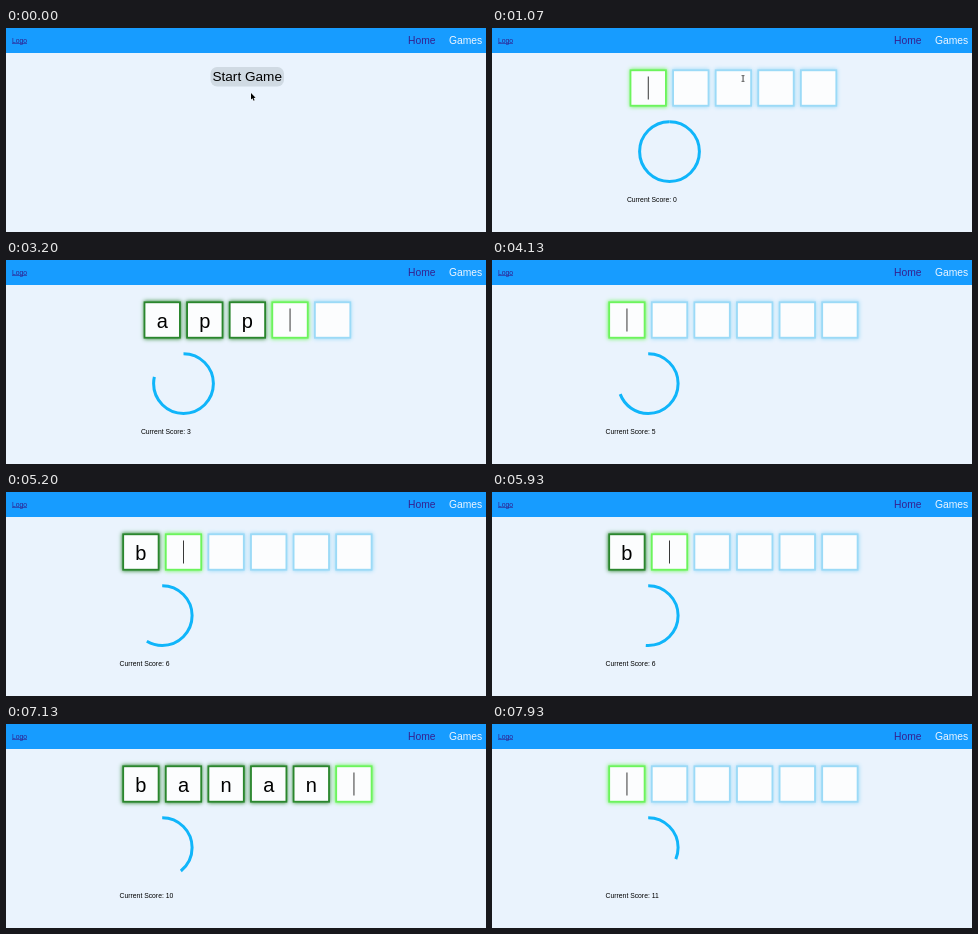
Recreate the animation shown at these times as an HTML page with a canvas. Size 480x204 px, loop 8 s.

```html
<!DOCTYPE html>
<html lang="en">
<head>
<meta charset="utf-8">
<title>Typing game</title>
<style>
  html, body { margin: 0; width: 100%; height: 100%; overflow: hidden; background: #eaf3fd; }
  canvas { display: block; }
</style>
</head>
<body>
<canvas id="stage" width="480" height="204"></canvas>
<script>
const ctx = document.getElementById('stage').getContext('2d');
const LOOP = 8000, GAME_START = 1000, TIMER_START = 1060, TIMER = 10000;
const PITCH = 42.6, MIDDLE = 241.4, BOX = 36;
const words = ['apple', 'banana', 'orange'];
// Times of the key presses, in ms
const keys = [2330, 2670, 3000, 3470, 3740, 4930, 6330, 6670, 6800, 6950, 7470];

function text(str, x, y, size, color, align = 'left') {
  ctx.font = `${size}px "Liberation Sans", Arial, sans-serif`;
  ctx.textAlign = align;
  ctx.fillStyle = color;
  ctx.fillText(str, x, y);
}

function rect(x, y, w, h, color) {
  ctx.fillStyle = color;
  ctx.fillRect(x, y, w, h);
}

function header() {
  rect(0, 0, 480, 204, '#eaf3fd');
  rect(0, 0, 480, 25, '#179cff');
  text('Logo', 6, 14.6, 6.8, '#30208f');
  rect(6, 15.3, 15, 0.6, '#30208f');
  text('Home', 402, 16.2, 10.3, '#35208f');
  text('Games', 443, 16.2, 10.3, '#edf5ff');
}

function arrow(x, y) {
  ctx.beginPath();
  [[0, 0], [0, 6.6], [1.5, 5.3], [2.6, 7.7], [3.6, 7.2], [2.6, 4.9], [4.6, 4.8]]
    .forEach(([dx, dy]) => ctx.lineTo(x + dx, y + dy));
  ctx.closePath();
  ctx.lineWidth = 0.8;
  ctx.strokeStyle = '#fff';
  ctx.stroke();
  ctx.fillStyle = '#000';
  ctx.fill();
}

function ibeam(x, y) {
  rect(x - 0.4, y - 2.8, 0.9, 5.6, '#333');
  rect(x - 1.5, y - 3.2, 3, 0.8, '#444');
  rect(x - 1.5, y + 2.4, 3, 0.8, '#444');
}

function startScreen(t) {
  const p = Math.min(1, Math.max(0, (t - 70) / 400));
  const e = p * p * (3 - 2 * p);
  const y = 65 - 16 * e;
  ctx.beginPath();
  ctx.roundRect(204.5, 39, 73.5, 19.5, 6.5);
  ctx.fillStyle = y < 58 ? '#c6d0d9' : '#d0dae3';
  ctx.fill();
  text('Start Game', 241.2, 53.3, 13.6, '#000', 'center');
  arrow(245 + 5 * e, y);
}

function letterBox(x, color, blur) {
  ctx.save();
  ctx.shadowColor = color;
  ctx.shadowBlur = blur;
  rect(x - BOX / 2 - 0.6, 41.4, BOX + 1.2, BOX + 1.2, color);
  ctx.restore();
  rect(x - BOX / 2 + 1.2, 43.2, BOX - 2.4, BOX - 2.4, '#fcfdfe');
}

function game(t) {
  const score = keys.filter(k => k <= t).length;
  let typed = score, n = 0;
  while (typed >= words[n].length) typed -= words[n++].length;
  const word = words[n];
  const first = MIDDLE - (word.length - 1) / 2 * PITCH;
  const left = first - PITCH / 2;

  [...word].forEach((ch, i) => {
    const x = first + i * PITCH;
    if (i < typed) {
      letterBox(x, '#2a862d', 4);
      text(ch, x, 67.5, 20, '#000', 'center');
    } else if (i === typed) {
      letterBox(x, '#6cf45c', 4);
      const since = t - (score ? keys[score - 1] : GAME_START);
      if (since % 1000 < 500) rect(x - 0.4, 48.5, 0.9, 23, '#222');
    } else {
      letterBox(x, '#9bdaf7', 4);
    }
  });

  const remaining = 1 - Math.max(0, t - TIMER_START) / TIMER;
  ctx.beginPath();
  ctx.arc(left + PITCH, 123.6, 29.9, -Math.PI / 2, (2 * remaining - 0.5) * Math.PI);
  ctx.lineWidth = 3;
  ctx.strokeStyle = '#10b5fa';
  ctx.stroke();

  text('Current Score: ' + score, left, 173.6, 6.8, '#000');
  if (!score) ibeam(251, 50.5);
}

function draw(now) {
  const t = now % LOOP;
  header();
  if (t < GAME_START) startScreen(t);
  else game(t);
  requestAnimationFrame(draw);
}
requestAnimationFrame(draw);
</script>
</body>
</html>
```
